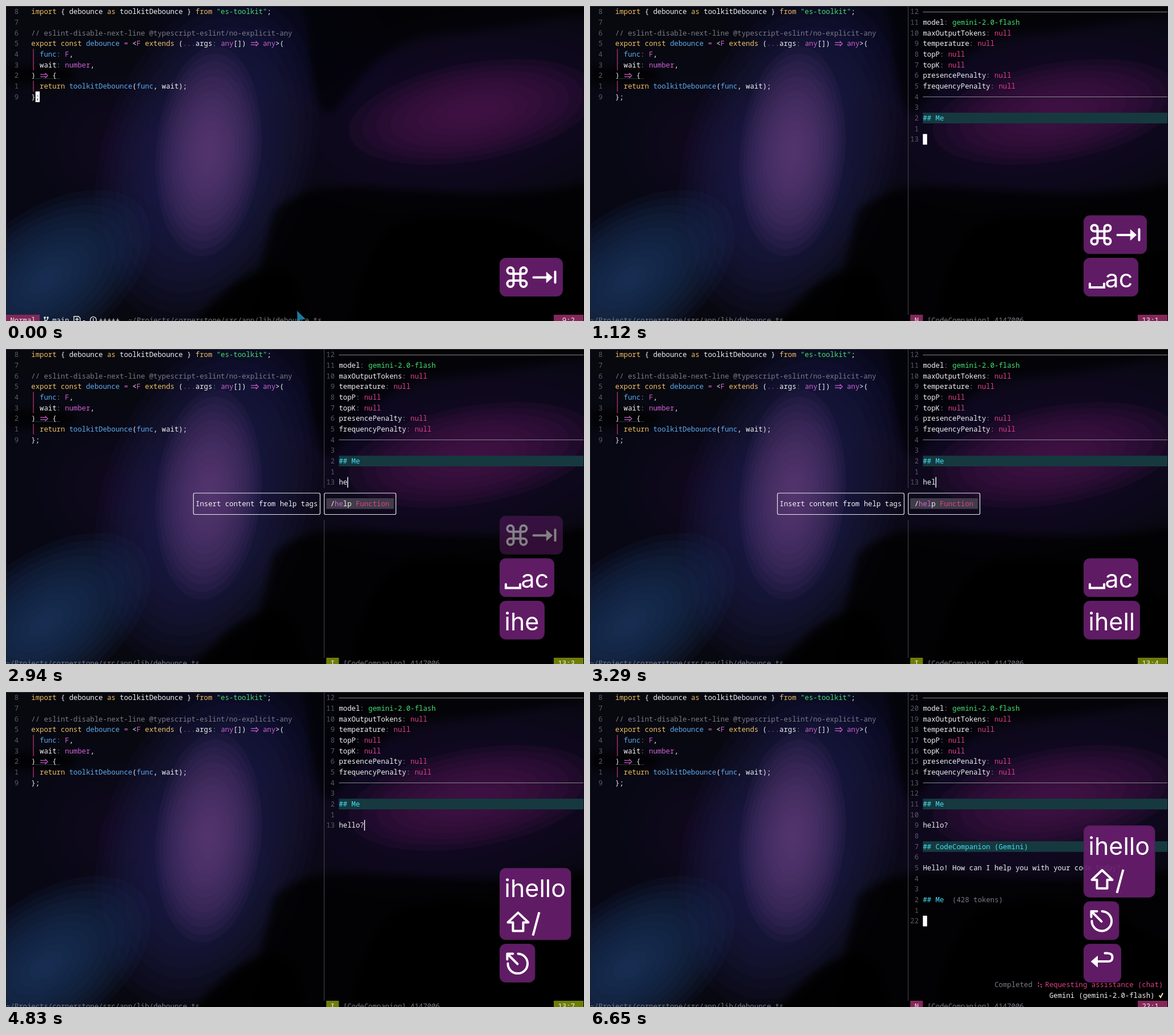
Animation of 1013 by 553 pixels, one loop 6790 ms. Source, as an HTML page:

```html
<!DOCTYPE html>
<html lang="en">
<head>
<meta charset="utf-8">
<title>Editor chat</title>
<style>
html, body { margin: 0; width: 100%; height: 100%; overflow: hidden; background: #05050c; }
svg { display: block; width: 100vw; height: 100vh; }
text { font: 12.308px "Noto Sans Mono", "DejaVu Sans Mono", monospace; white-space: pre; }
.cap text { font: 43px Inter, "Open Sans", sans-serif; fill: #fff; }
.cap path { fill: none; stroke: #fff; stroke-width: 4; stroke-linejoin: round; stroke-linecap: round; }
.cap .solid { fill: #fff; stroke-width: 1; }
</style>
</head>
<body>
<svg viewBox="0 0 1013 553" preserveAspectRatio="none">
  <defs><filter id="soft" x="-20%" y="-20%" width="140%" height="140%"><feGaussianBlur stdDeviation="7"/></filter></defs>
  <g id="backdrop"></g>
  <g id="stage"></g>
</svg>
<script>
(() => {
const LOOP = 6790, STEP = 70;
const CW = 7.385, RH = 18.67;
const MAGENTA = '#84285a', GREEN = '#6f7c08', CYAN = '#40e0f2', PINK = '#dc4187', GREY = '#7b7b86';
const INK = { w: '#f2f2f4', y: '#efc164', b: '#5fabee', p: '#cf62d2', m: '#8c4a94', g: '#45df70',
  c: GREY, n: '#5b5b64', k: PINK, a: CYAN, d: '#17171c' };

const X = col => col * CW;
const Y = row => .67 + row * RH;
const esc = s => s.replace(/&/g, '&amp;').replace(/</g, '&lt;');
const rect = (x, y, w, h, fill, more = '') =>
  `<rect x="${x}" y="${y}" width="${w}" height="${h}" fill="${fill}" ${more}/>`;
const stroke = (d, color, width = 1) =>
  `<path d="${d}" fill="none" stroke="${color}" stroke-width="${width}"/>`;
const since = (t, times) => times.filter(x => t >= x).length;

// Tokens are split by "|"; the first letter picks the ink.
function line(col, row, tokens, italic) {
  const spans = tokens.split('|').map(s => `<tspan fill="${INK[s[0]]}">${esc(s.slice(1))}</tspan>`);
  return `<text x="${X(col)}" y="${Y(row) + 13.6}"${italic ? ' font-style="italic"' : ''}>${spans.join('')}</text>`;
}

function arrow(col, row) {
  const x = X(col) + 1, y = Y(row) + 9.5;
  return stroke(`M${x} ${y - 2}h11M${x} ${y + 2}h11M${x + 8.5} ${y - 4.5}l4.5 4.5l-4.5 4.5`, INK.p, 1.2);
}

/* ---------- backdrop ---------- */
function glow(x, y, rx, ry, turn, color, strength, n = 12) {
  const a = 1 - (1 - strength) ** (1 / n);
  let out = '';
  for (let k = n; k > 0; k--)
    out += `<ellipse rx="${rx * k / n}" ry="${ry * k / n}" fill="${color}" fill-opacity="${a}"/>`;
  return `<g transform="translate(${x} ${y}) rotate(${turn})">${out}</g>`;
}

function sky() {
  const dark = (d, fill, a) => `<path d="${d}" fill="${fill}" fill-opacity="${a}"/>`;
  return rect(0, 0, 1013, 553, '#08080f') +
    glow(100, 300, 330, 260, 0, '#10101f', .6) +
    glow(470, 60, 260, 130, 15, '#111429', .6) +
    glow(185, 245, 130, 120, 10, '#22102a', .5, 8) +
    glow(352, 270, 185, 295, 17, '#25265a', .76, 16) +
    glow(800, 190, 360, 180, -10, '#1b1030', .7, 14) +
    '<g filter="url(#soft)">' +
    dark('M470 360C530 305 600 318 690 322S880 340 1030 310V570H420Z', '#020207', .75) +
    dark('M600 570C628 450 650 385 715 374S890 370 945 405S1000 440 1030 440V570Z', '#000', 1) +
    dark('M310 570C370 520 400 468 460 462S510 510 535 570Z', '#000', .85) +
    dark('M520 0C540 90 530 150 556 184S620 60 760 50S940 20 1030 15V-10H520Z', '#05050a', .6) +
    dark('M0 105H60Q122 104 122 122T60 138H0Z', '#050607', .7) +
    '</g>' +
    glow(70, 480, 210, 120, -36, '#1c3b68', .75) +
    glow(355, 255, 92, 185, 5, '#61417a', .78, 14) +
    glow(818, 186, 220, 86, -10, '#48164b', .8, 9) +
    stroke('M45 127.5H95', '#1d3a2b') +
    rect(0, 0, 1013, 1, '#34343a') + rect(0, 0, 1, 553, '#1c1c26');
}

/* ---------- left pane ---------- */
const CODE = [
  'yimport |w{ debounce |yas |wtoolkitDebounce } |yfrom |g"es-toolkit"|w;', '', '',
  'yexport const |bdebounce |p= |w<|pF |yextends |w(|m...|wargs|c: |pany|w[])    |pany|w>(',
  'w  |bfunc|c: |pF|w,',
  'w  wait|c: |pnumber|w,',
  'w)    {',
  'w  |yreturn |btoolkitDebounce|w(|bfunc|w, wait);',
  'w};'
];
const LEFT = CODE.map((s, r) => line(2, r, 'n' + (r < 8 ? 8 - r : 9)) + (s && line(6, r, s))).join('') +
  line(6, 2, 'c// eslint-disable-next-line @typescript-eslint/no-explicit-any', true) +
  arrow(58, 3) + arrow(8, 6) +
  stroke(`M48 ${Y(4)}V${Y(6)}M48 ${Y(7)}V${Y(8)}`, '#a8325f', 1.4);

const PATH = 'c~/Projects/cornerstone/src/app/lib/debounce.ts';

const badge = (col, cols, label, fill) =>
  rect(X(col), 542, X(cols), 11, fill) + line(col + 1, 29, 'w' + label);
const position = (s, fill) => rect(960, 542, 52, 11, fill) + line(135 - s.length, 29, 'w' + s);

function soloStatus() {
  return badge(0, 8, 'Normal', MAGENTA) + line(11, 29, 'wmain') +
    stroke('M68 547v8M73 547v2q0 3-5 4', INK.w, 1.3) +
    `<g fill="${INK.w}"><circle cx="68" cy="547" r="1.8"/><circle cx="73" cy="547" r="1.8"/></g>` +
    stroke('M119 556v-11h8l3 3v8M121.5 550h6M124.5 547v6', INK.w, 1.3) +
    line(18, 29, 'w-') +
    '<circle cx="153" cy="551" r="5.3" fill="none" stroke="#f2f2f4" stroke-width="1.3"/>' +
    stroke('M153 548v5', INK.w, 1.3) +
    line(22, 29, 'w+++++') + line(29, 29, PATH) + position('9:2', MAGENTA);
}

const pointer = alpha =>
  `<path d="M510 535L525 549.5L516 550.5L511 556Z" fill="#187a9c" fill-opacity="${alpha}"/>`;

/* ---------- key menu ---------- */
function robot(row) {
  const y = Y(row) + 9.5;
  return stroke(`M791 ${y + 5.5}v-3q0-4 5.5-4t5.5 4v3zM796.5 ${y - 1.5}v-4M789.8 ${y + 2}v3M803.2 ${y + 2}v3`, CYAN, 1.4) +
    `<g fill="${CYAN}"><circle cx="794.5" cy="${y + 2.5}" r="1"/><circle cx="798.5" cy="${y + 2.5}" r="1"/></g>`;
}

function keyMenu() {
  const items = ['aAction Palette', 'cNew Chat', 'CGenerate a command in CLI', 'iInline Prompt', 'tToggle Chat'];
  const y = Y(26) + 9.5;
  return rect(750, 402, 251, 131, '#020207', 'fill-opacity=".5"') +
    stroke('M757 402.5H752.5Q750 402.5 750 405V530Q750 532.5 752.5 532.5H998.5Q1000.5 532.5 1000.5 530V405Q1000.5 402.5 998 402.5H827', '#45454e') +
    stroke('M761.5 400v4h9v-4', CYAN, 1.2) + line(106, 21, 'a» +AI') +
    items.map((s, i) => line(103, 22 + i, `a${s[0]} |c→`) + line(109, 22 + i, 'k' + s.slice(1)) +
      (i < 4 ? robot(22 + i) : '')).join('') +
    rect(791, y - 4, 13, 8, 'none', 'rx="4" stroke="#eccb62" stroke-width="1.5"') +
    `<circle cx="795" cy="${y}" r="2.6" fill="#eccb62"/>` +
    `<text x="811" y="517" fill="${CYAN}" style="font-size:8.3px;font-weight:700">ESC</text>` +
    line(113, 27, 'cclose', true) + line(122, 27, 'cback', true) +
    `<path d="M886 514l4-4.5h10v9h-10z" fill="${CYAN}"/>` + stroke('M892 511.5l5 5m0-5l-5 5', '#111', 1.2);
}

/* ---------- chat pane ---------- */
const SETTINGS = ['model|c: |ggemini-2.0-flash',
  ...['maxOutputTokens', 'temperature', 'topP', 'topK', 'presencePenalty', 'frequencyPenalty'].map(s => s + '|c: |knull')];

const heading = (row, s) => rect(583.4, Y(row), 428.6, RH, '#16393f') + line(79, row, 'a' + s);

function chat(t) {
  const replied = t >= 6510, insert = t >= 2030 && t < 4900;
  const typed = 'hello?'.slice(0, since(t, [2590, 2800, 3290, 3360, 3500, 3850]));
  const hint = t >= 2660 && t < 3360;
  const last = replied ? 21 : 12;
  const col = replied ? 0 : insert ? typed.length : Math.max(0, typed.length - 1);
  const mode = insert ? GREEN : MAGENTA;
  let out = stroke(hint ? 'M557.6 1V244M557.6 300V542' : 'M557.6 1V542', '#3d3d45', 1.2) +
    stroke('M583.4 10.5H1012M583.4 159.5H1012', '#86868e') + heading(10, '## Me');
  for (let r = 0; r <= last; r++) {
    const n = String(r < last ? last - r : last + 1);
    out += line(78 - n.length, r, 'n' + n);
  }
  out += SETTINGS.map((s, i) => line(79, i + 1, 'w' + s)).join('');
  if (replied) {
    out += heading(14, '## CodeCompanion (Gemini)') +
      line(79, 16, 'wHello! How can I help you with your code today?') +
      line(79, 19, 'a## Me') + line(86, 19, 'c(428 tokens)', true);
  }
  if (typed) out += line(79, 12, 'w' + typed);
  out += rect(X(79 + col), Y(last), insert ? 1.4 : CW, RH, '#fff');
  if (!insert && typed && !replied) out += line(79 + col, last, 'd' + typed.slice(-1));
  if (hint) out += completion(typed);
  if (t >= 5740) out += progress(t);
  return out + line(0, 29, PATH) + badge(76, 3, insert ? 'I' : 'N', mode) +
    line(80, 29, 'c[CodeCompanion] 4147006') + position(`${last + 1}:${col + 1}`, mode);
}

function completion(typed) {
  const frame = (x, w) => rect(x, 253, w, 37.5, 'none', 'rx="2.5" stroke="#e8e8ec" stroke-width="1.2"');
  return frame(328.5, 222) + frame(557.8, 125.6) + rect(561.3, 262, 118.5, 18.7, '#403c49') +
    line(45, 14, 'wInsert content from help tags') +
    line(77, 14, `w/|p${typed}|w${'help'.slice(typed.length)} |kFunction`);
}

function progress(t) {
  const done = t >= 6580, note = done ? 'Completed' : 'In progress...';
  const dots = [[786, 511], [790.5, 513.5], [786, 516], [791, 517.5]];
  return line(105 - note.length, 27, 'c' + note, true) +
    dots.map(([x, y]) => `<circle cx="${x}" cy="${y}" r="1.2" fill="${PINK}"/>`).join('') +
    line(108, 27, 'kRequesting assistance (chat)', true) +
    line(109, 28, 'wGemini (gemini-2.0-flash)', true) +
    (done ? stroke('M997.5 532.5l2.5 3.5l4-7.5', '#eee4b4', 2)
      : line(135, 28, 'w' + '⠋⠙⠹⠸⠼'[since(t, [6090, 6160, 6300, 6370])]));
}

/* ---------- key captions, drawn relative to each box ---------- */
const word = (x, y, s) => `<text x="${x}" y="${y}">${s}</text>`;
const ICON = {
  command: '<path d="M24 28v-6a5.5 5.5 0 1 0-5.5 5.5h23a5.5 5.5 0 1 0-5.5-5.5v23a5.5 5.5 0 1 0 5.5-5.5h-23a5.5 5.5 0 1 0 5.5 5.5z"/>',
  tab: '<path d="M59 34H86M97 24V43"/><path class="solid" d="M82 25L92 34L82 43Z"/>',
  space: '<path d="M10.5 45v6.5h25v-6.5" style="stroke-linejoin:miter"/>',
  shift: '<path d="M32 78L50 95H41V110H23V95H14Z"/><path d="M69 77L58 118" style="stroke-linecap:butt"/>',
  escape: '<path d="M32 17A17.3 17.3 0 1 1 14 34M31 35L14 18M13 27V17H23"/>',
  enter: '<path d="M37 16Q50 15 50 23T42 30.5H20"/><path class="solid" d="M13 30.5L24 21V40Z"/>'
};

function captions(t) {
  const fade = from => t < from ? 1 : Math.max(0, .75 - .25 * Math.floor((t - from) / STEP));
  const list = [[110, 67, ICON.command + ICON.tab, fade(2870)]];
  if (t >= 420) {
    const n = since(t, [490, 770]);
    list.push([[46, 71, 95][n], 67, ICON.space + word(37, 51, 'ac'.slice(0, n)), fade(3780)]);
  }
  if (t >= 2030) {
    const n = since(t, [2520, 2730, 3220, 3290, 3430]), tall = t >= 3780;
    list.push([[26, 52, 78, 88, 98, 124.5][n], tall ? 125.5 : 67,
      word(8, 51, 'ihello'.slice(0, n + 1)) + (tall ? ICON.shift : ''), 1]);
  }
  if (t >= 4830) list.push([61.5, 67, ICON.escape, 1]);
  if (t >= 5670) list.push([65, 67, ICON.enter, 1]);

  let y = 509.5, out = '';
  for (const [w, h, body, alpha] of list.reverse()) {
    y -= h;
    if (alpha > 0) out += `<g class="cap" transform="translate(865.5 ${y})" opacity="${alpha}">` +
      rect(0, 0, w, h, '#671d6c', 'rx="10" fill-opacity=".94" stroke="#4b2351"') + body + '</g>';
    y -= 7.6;
  }
  return out;
}

/* ---------- clock ---------- */
const stage = document.getElementById('stage');
let shown = '';

function render(t) {
  let html = LEFT;
  if (t < 910) {
    html += rect(X(7), Y(8), CW, RH, '#fff') + line(7, 8, 'd;') + soloStatus();
    if (t < 210) html += pointer(t < 140 ? 1 : .45);
    if (t >= 560 && t < 840) html += keyMenu();
  } else html += chat(t);
  html += captions(t);
  if (html !== shown) stage.innerHTML = shown = html;
}

document.getElementById('backdrop').innerHTML = sky();
const began = performance.now();
function tick() {
  render((performance.now() - began) % LOOP);
  requestAnimationFrame(tick);
}
tick();
})();
</script>
</body>
</html>
```
